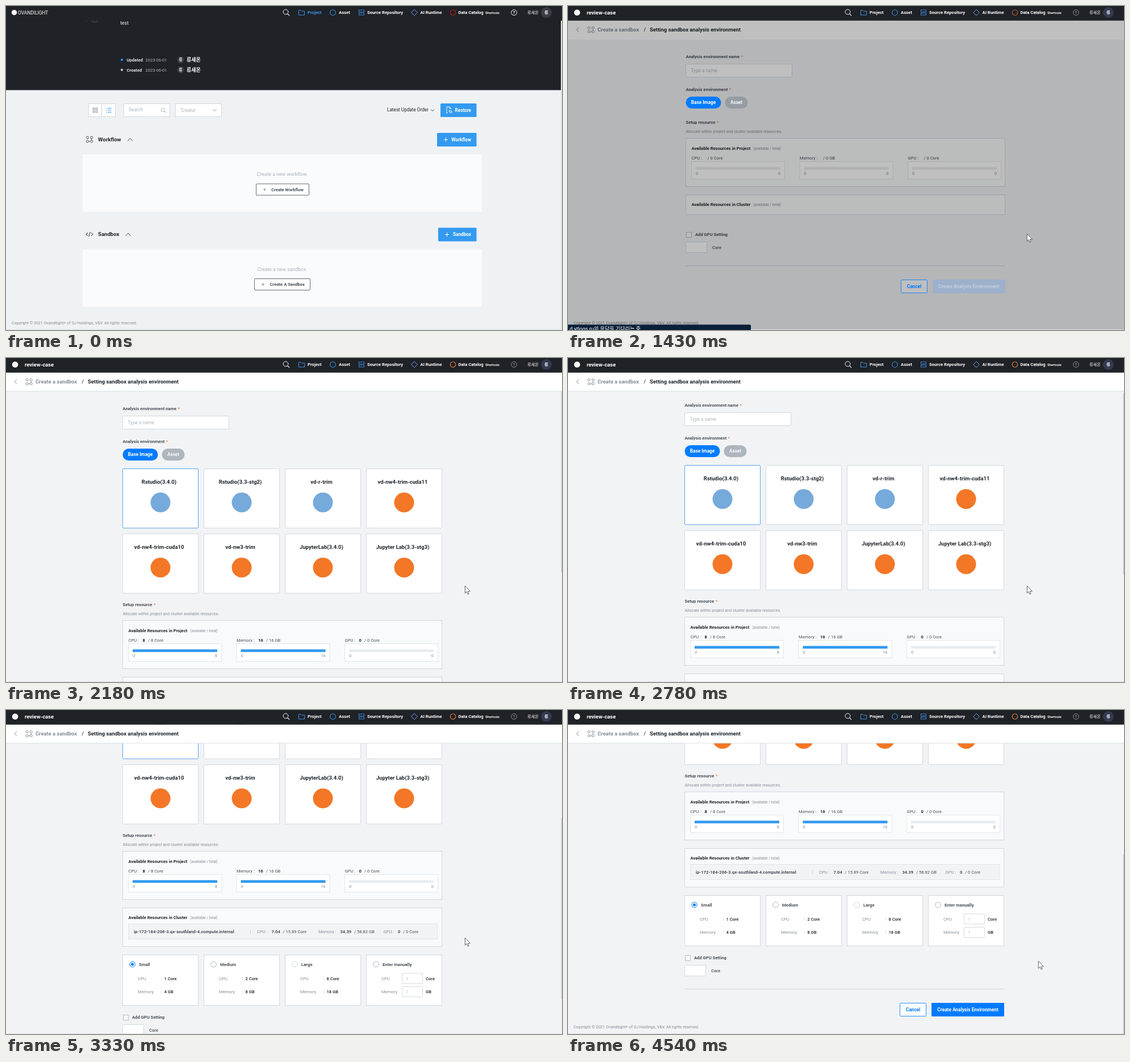
An HTML page that plays this animation: 979 by 572 pixels, repeating every 4.61 s.

```html
<!DOCTYPE html>
<html lang="en">
<head>
<meta charset="utf-8">
<title>Sandbox setup</title>
<style>
html, body { margin: 0; width: 100%; height: 100%; overflow: hidden; background: #f1f3f5; }
svg { display: block; width: 100%; height: 100%; font-family: Roboto, "Noto Sans CJK KR", "Noto Sans CJK", sans-serif; }
text { white-space: pre; }
</style>
</head>
<body>
<svg id="stage" viewBox="0 0 979 572"></svg>
<script>
const LOOP = 4610;
const INK = '#212529', DARK = '#1f2226', BODY = '#495057', GREY = '#868e96', PALE = '#adb5bd';
const LINE = '#ced4da', SKY = '#339af0', BLUE = '#007bff', WHITE = '#fff';
const USER = '류새온', INITIAL = '류';

// y is the vertical middle of the capitals
const text = (x, y, s, size = 7.6, fill = BODY, weight = 400, anchor = 'start') =>
  `<text x="${x}" y="${(y + size * 0.36).toFixed(2)}" font-size="${size}" fill="${fill}" font-weight="${weight}" text-anchor="${anchor}">${s}</text>`;
const bold = (x, y, s, size = 7.6, fill = BODY, anchor) => text(x, y, s, size, fill, 700, anchor);
const box = (x, y, w, h, fill, stroke, r = 0) => stroke
  ? `<rect x="${x + 0.5}" y="${y + 0.5}" width="${w - 1}" height="${h - 1}" rx="${r}" fill="${fill}" stroke="${stroke}" stroke-width=".85"/>`
  : `<rect x="${x}" y="${y}" width="${w}" height="${h}" rx="${r}" fill="${fill}"/>`;
const line = (d, stroke, w = 1) => `<path d="${d}" fill="none" stroke="${stroke}" stroke-width="${w}"/>`;
const dot = (x, y, r, fill, stroke = 'none', w = 1) =>
  `<circle cx="${x}" cy="${y}" r="${r}" fill="${fill}" stroke="${stroke}" stroke-width="${w}"/>`;
const group = (id, body) => `<g id="${id}">${body}</g>`;
const plus = (x, y, c, r = 3.5) => line(`M${x - r} ${y}h${2 * r}M${x} ${y - r}v${2 * r}`, c);
const chevron = (x, y, c, w, h) => line(`M${x - w} ${y - h / 2}l${w} ${h}l${w} ${-h}`, c);
const lens = (x, y, r, c) => dot(x, y, r, 'none', c) + line(`M${x + r * 0.7} ${y + r * 0.7}l${r * 0.8} ${r * 0.8}`, c, 1.1);
const nodes = (x, y, c) => [[-3.6, -3.4], [3.6, -3.4], [-3.6, 3.4], [3.6, 3.4]]
  .map(([a, b]) => `<rect x="${x + a - 1.9}" y="${y + b - 1.9}" width="3.8" height="3.8" rx="1.3" fill="none" stroke="${c}"/>`).join('')
  + line(`M${x - 1.7} ${y + 3.4}h3.4M${x + 3.6} ${y - 1.5}v3`, c, 0.8);

function nav(active, ring, help, avatar) {
  const c = '#3d94ee';
  return lens(492.5, 10.5, 4.4, WHITE)
    + line('M515.5 7.5h3.5l1.5 1.6h5v6.9h-10z', c) + bold(531, 11.5, 'Project', 7.65, active)
    + line('M575.5 6.2l4.6 2.7v5.4l-4.6 2.7l-4.6-2.7v-5.4z', c) + bold(586, 11.5, 'Asset', 7.65, WHITE)
    + box(621, 6.5, 10, 4.5, 'none', c) + box(621, 12, 10, 4.5, 'none', c)
    + bold(636, 11.5, 'Source Repository', 7.65, WHITE)
    + line('M719 6.2l5.3 5.3l-5.3 5.3l-5.3-5.3z', '#6fa5f5') + bold(729.5, 11.5, 'AI Runtime', 7.65, WHITE)
    + `<circle id="${ring}" cx="787" cy="11.5" r="4.7" fill="none" stroke="${ring === 'ringA' ? '#cf201c' : '#f0813a'}" stroke-width="1.1"/>`
    + bold(796.5, 11.5, 'Data Catalog', 7.65, WHITE) + bold(844, 11.8, 'Shortcuts', 5.7, WHITE)
    + dot(894.5, 11.5, 4.9, 'none', help) + bold(894.5, 11.5, '?', 7, help, 'middle')
    + text(918, 11.5, USER, 7.2, WHITE) + dot(951.5, 11.5, 9.4, avatar)
    + bold(951.5, 11.5, INITIAL, 7.4, WHITE, 'middle');
}

const copyright = y => text(10, y, 'Copyright © 2021 Ovandilight+ of OJ Holdings, V&amp;V. All rights reserved.', 7.02, GREY);

function section(y, name, lower, label, bx, cx, cw) {
  return bold(162, y, name, 9.6, INK)
    + chevron(name === 'Workflow' ? 218.5 : 215, y + 0.5, BODY, 4.5, -5)
    + box(bx, y - 11.5, 828.5 - bx, 24, SKY, null, 1.5)
    + plus(bx + 15.5, y + 0.5, WHITE) + bold(819, y + 0.5, name, 8.2, WHITE, 'end')
    + box(135, y + 26.5, 703, 101.5, '#fafbfc')
    + text(486.5, y + 61.5, `Create a new ${lower}.`, 8.7, PALE, 400, 'middle')
    + box(cx, y + 78, cw, 21, WHITE, BODY, 1)
    + plus(cx + 15.5, y + 88.5, GREY, 2.5) + bold(cx + cw - 10, y + 88.5, label, 7.65, BODY, 'end');
}

function project() {
  const person = (y, label, c) => dot(204, y, 2, c) + bold(212.5, y, label, 7.6, '#dee2e6')
    + text(245.5, y, '2023-06-01', 7.55, PALE) + dot(307.5, y, 6, '#3a3e43')
    + bold(307.5, y, INITIAL, 6.4, WHITE, 'middle') + bold(318, y, USER, 9, WHITE);
  const grid = [[152.5, 179.5], [157.5, 179.5], [152.5, 184.5], [157.5, 184.5]]
    .map(([x, y]) => box(x, y, 4, 4, 'none', GREY)).join('');
  const list = [180.5, 184, 187.5].map(y => line(`M176 ${y}h1.5M179 ${y}h6.5`, SKY, 1.2)).join('');
  return box(0, 0, 979, 572, '#eff2f5') + box(0, 0, 979, 148.5, DARK)
    + line('M150 25.5Q156 31 162 25.5', '#3a3e43', 2) + line('M139.5 26.5h3', '#3a3e43')
    + box(0, 0, 979, 25.5, DARK)
    + dot(14.5, 11.5, 4.7, WHITE) + text(21, 12, 'OVANDILIGHT', 8.4, WHITE)
    + nav('#3d94ee', 'ringA', WHITE, '#3a3e44')
    + text(201, 30, 'test', 8.78, '#f1f3f5')
    + person(95, 'Updated', SKY) + person(112.8, 'Created', LINE)
    + box(145, 172, 48, 24, WHITE, LINE) + line('M168.5 172v24', LINE) + grid + list
    + box(207, 172, 82, 24, WHITE, LINE) + text(216, 183.5, 'Search', 8.2, PALE) + lens(276.5, 183.5, 3.2, PALE)
    + box(298, 172, 82, 24, WHITE, LINE) + text(307.5, 184, 'Creator', 8.2, PALE) + chevron(367.5, 184, GREY, 3, 3)
    + text(671, 183.5, 'Latest Update Order', 8.2, INK) + chevron(751, 184, BODY, 3, 3)
    + box(765, 172, 63.5, 24, SKY, null, 1.5)
    + line('M783.5 182v-1.5l-2.5-2.5h-5v11h2M781 178v3h2.5M785 185.5h-5M782 183.5l-2.3 2l2.3 2M785 185.5v3h-4', WHITE, 0.9)
    + bold(819, 183.8, 'Restore', 8.2, WHITE, 'end')
    + nodes(147, 235.5, BODY) + section(235.5, 'Workflow', 'workflow', 'Create Workflow', 759, 440, 94)
    + line('M144 400l-3.2 3l3.2 3M150 400l3.2 3l-3.2 3M148.2 399l-2.4 8', INK)
    + section(403, 'Sandbox', 'sandbox', 'Create A Sandbox', 761, 437, 99)
    + copyright(559.5) + box(977, 26, 2, 546, '#dfe2e5');
}

const COLS = [205, 348, 491, 634];
const IMAGES = ['Rstudio(3.4.0)', 'Rstudio(3.3-stg2)', 'vd-r-trim', 'vd-nw4-trim-cuda11',
  'vd-nw4-trim-cuda10', 'vd-nw3-trim', 'JupyterLab(3.4.0)', 'Jupyter Lab(3.3-stg3)'];

const images = () => IMAGES.map((name, i) => {
  const x = COLS[i % 4], y = i < 4 ? 195 : 310;
  return box(x, y, 134, 105.7, WHITE, i ? LINE : '#3f93e8', 1.5)
    + bold(x + 64.5, y + 23.5, name, 9.5, INK, 'middle')
    + dot(x + 67, y + 60, 17.5, i < 3 ? '#75aadb' : '#f37726');
}).join('');

const METERS = [['CPU :', 8, 'Core', 25.5, 28.5], ['Memory :', 16, 'GB', 38.5, 41.5], ['GPU :', 0, 'Core', 25.5, 28.5]];

function resources() {
  const meters = METERS.map(([label, n, unit, nx, wx], i) => {
    const x = 215 + 190.5 * i, vx = x + nx + (n > 9 ? 14 : 9.5);
    return text(x + 0.5, 498.2, label, 7.6, BODY)
      + `<g class="live">${bold(x + nx, 498.2, n, 7.6, INK)}${text(vx, 498.2, `/ ${n} ${unit}`, 7.6, BODY)}</g>`
      + `<g class="wait">${text(x + wx, 498.5, `/ 0 ${unit}`, 7.6, BODY)}</g>`
      + box(x, 504, 165, 32, WHITE, '#dee2e6') + box(x + 8, 514.4, 149, 4.7, '#e9ecef')
      + (n ? `<rect class="bar" x="${x + 8}" y="514.4" width="0" height="4.7" fill="${SKY}"/>` : '')
      + text(x + 8, 524.8, 0, 7.6, GREY)
      + `<g class="live">${text(x + 157, 524.8, n, 7.6, GREY, 400, 'end')}</g>`
      + `<g class="wait">${text(x + 157, 524.8, 0, 7.6, GREY, 400, 'end')}</g>`;
  }).join('');
  const stat = (x, label, nx, n, vx, v) => text(x, 605.5, label, 7.6, GREY)
    + bold(nx, 605.5, n, 7.6, BODY) + text(vx, 605.5, v, 7.6, BODY);
  const row = box(215, 591, 545, 28, '#f1f3f5', '#dee2e6')
    + bold(225, 605.5, 'ip-172-184-206-3.qx-southland-4.compute.internal', 7.6, BODY)
    + line('M430.5 602v7', LINE)
    + stat(442, 'CPU :', 467.5, '7.04', 487.5, '/ 15.89 Core')
    + stat(550, 'Memory :', 588.5, '34.39', 613, '/ 58.82 GB')
    + stat(664.5, 'GPU :', 690, '0', 699, '/ 0 Core');
  return bold(205.5, 435.3, 'Setup resource', 7.6, BODY) + bold(260, 435.3, '*', 7.6, '#f0813a')
    + text(205.5, 451.1, 'Allocate within project and cluster available resources.', 7.02, GREY)
    + box(205, 463, 563, 86, '#f9fafb', LINE)
    + bold(215.5, 481.5, 'Available Resources in Project', 7.6, INK) + text(324.3, 481.8, '(available / total)', 6.44, GREY)
    + meters
    + `<rect id="cluster" x="205.5" y="563.5" width="562" height="35" fill="#f9fafb" stroke="${LINE}" stroke-width=".85"/>`
    + bold(215.5, 580.5, 'Available Resources in Cluster', 7.6, INK) + text(324.3, 580.8, '(available / total)', 6.44, GREY)
    + `<g class="live">${row}</g>`;
}

function plans() {
  const rows = [688, 711.5];
  return [['Small', 1, 4], ['Medium', 2, 8], ['Large', 8, 18], ['Enter manually']].map(([name, cpu, mem], i) => {
    const x = COLS[i], on = i === 0;
    const cells = rows.map((y, k) => {
      const unit = k ? 'GB' : 'Core';
      return text(x + 27, y, k ? 'Memory' : 'CPU', 7.7, GREY) + (cpu
        ? line(`M${x + 68.5} ${y - 3}v6`, '#dee2e6') + text(x + 73.5, y, `${k ? mem : cpu} ${unit}`, 7.6, INK, 500)
        : box(x + 63, y - 9.5, 37, 19, WHITE, LINE, 1) + text(x + 70, y, 1, 7.6, PALE) + text(x + 105, y, unit, 7.6, INK, 500));
    }).join('');
    return box(x, 646, 134, 90, WHITE, LINE)
      + dot(x + 17.5, 663, 4.8, WHITE, on ? BLUE : i === 2 ? LINE : PALE) + (on ? dot(x + 17.5, 663, 2.5, BLUE) : '')
      + bold(x + 29, 663, name, 7.7, BODY) + cells;
  }).join('');
}

const footer = () => box(206, 752, 10, 10, '#f8f9fa', PALE) + bold(222, 756.7, 'Add GPU Setting', 7.6, BODY)
  + box(205, 769, 38, 20, WHITE, LINE, 1) + text(252, 779, 'Core', 7.6, BODY, 500)
  + line('M205.5 811.5H768', LINE) + box(584, 836, 47, 24, WHITE);

const form = () => bold(205.5, 89.5, 'Analysis environment name', 7.6, BODY) + bold(302.5, 89.5, '*', 7.6, '#f0813a')
  + box(205, 102, 188, 24, WHITE, LINE, 1) + text(214.5, 114, 'Type a name', 8.2, PALE)
  + bold(205.5, 147.5, 'Analysis environment', 7.6, BODY) + bold(281.5, 147.5, '*', 7.6, '#f0813a')
  + `<g class="live">${images()}${plans()}</g>` + group('res', resources()) + group('foot', footer())
  + `<g class="live">${copyright(878.5)}</g>`;

const buttons = () => box(205.5, 160, 62, 21, BLUE, null, 10.5) + bold(236.5, 170.4, 'Base Image', 8.2, WHITE, 'middle')
  + '<rect id="asset" x="274.5" y="160" width="40" height="21" rx="10.5"/>'
  + bold(294.5, 170.4, 'Asset', 8.2, '#f8f9fa', 'middle')
  + group('actions', box(584, 836, 47, 24, 'none', BLUE, 1) + bold(607.5, 848, 'Cancel', 8.3, BLUE, 'middle')
    + '<rect id="create" x="640" y="836" width="128" height="24" rx="1"/>'
    + `<g id="createText">${bold(704, 848, 'Create Analysis Environment', 8.3, 'inherit', 'middle')}</g>`);

const topBar = () => box(0, 0, 979, 25.8, DARK) + dot(16, 11.5, 5.3, WHITE) + bold(33, 11.5, 'review-case', 9.4, WHITE)
  + nav(WHITE, 'ringB', '#8d9094', '#343a50');

const crumbs = () => box(0, 25.5, 979, 33, WHITE) + line('M0 58.5H979', '#dee2e6')
  + line('M19 38l-4 4l4 4', GREY) + nodes(40.5, 42, GREY)
  + bold(52, 42, 'Create a sandbox', 9.36, GREY) + bold(133.5, 42, '/', 9.36, BODY)
  + bold(144, 42, 'Setting sandbox analysis environment', 9.36, INK);

const stage = document.getElementById('stage');
stage.innerHTML = group('project', project())
  + group('setup', box(0, 0, 979, 572, '#f1f3f5')
    + group('form', form()) + `<g class="wait">${copyright(559.5)}</g>`
    + '<rect class="dim" width="979" height="572"/>'
    + group('buttons', buttons()) + crumbs() + '<rect class="dim" y="25.5" width="979" height="33"/>' + topBar()
    + '<rect id="thumb" x="977.7" width="1.3" fill="#c1c5c9"/>')
  + box(0, 571, 979, 1, '#dcdfe3')
  + group('status', '<path d="M0 562.5H320q2 0 2 2V572H0z" fill="#0a1f38"/>'
    + text(128, 570, 'd.ytlogs.ru의 응답을 기다리는 중', 9.15, WHITE, 400, 'end'))
  + group('cursor', '<path d="M.3 .3V13.2L3.2 10.5L5.1 15L7.1 14.1L5.2 9.8H9.3Z" fill="#fff" stroke="#222" stroke-width=".7"/>');

const $ = id => document.getElementById(id);
const all = c => [...stage.querySelectorAll(c)];
const live = all('.live'), wait = all('.wait'), dims = all('.dim'), bars = all('.bar');
const show = (el, on) => el.setAttribute('visibility', on ? 'inherit' : 'hidden');
const move = (id, x, y) => $(id).setAttribute('transform', `translate(${x} ${y})`);
const paint = (id, fill) => $(id).setAttribute('fill', fill);

// number of steps taken, the first at a and the n-th at b
const steps = (t, a, b, n) => t < a ? 0 : Math.min(n, 1 + Math.floor((t - a) * (n - 1) / (b - a) + 1e-6));
const mix = (a, b, p) => a + (b - a) * p;

const SCROLL = [0, 6, 22, 43, 64, 84.2, 111, 143, 178, 214, 250, 284, 308, 319];
const REACH_X = [838, 829, 818, 809, 803, 801, 804, 808];
const REACH_Y = [426, 419, 413, 408, 405, 403, 402, 402];

function cursorAt(t) {
  const enter = steps(t, 70, 280, 5), reach = steps(t, 420, 880, 7), leave = steps(t, 4340, 4540, 4) / 4;
  if (!enter) return [934, 600];
  if (!reach) {
    const p = 1 - (1 - (enter - 1) / 4) ** 1.5;
    return [mix(934, 838, p), mix(562, 426, p)];
  }
  return [mix(REACH_X[reach], 828, leave), mix(REACH_Y[reach], 443, leave)];
}

function draw(t) {
  const loaded = t >= 1640, shown = t >= 1360;
  const dim = t < 1430 ? 0.12 : 0.25 * (1 - steps(t, 1500, 1780, 5) / 5);
  const fill = steps(t, 1980, 2180, 4) / 4;
  const y = SCROLL[steps(t, 2780, 3260, 8) + steps(t, 3330, 3610, 5)];
  const x = loaded ? 0 : 2;

  show($('project'), !shown);
  show($('setup'), shown);
  show($('status'), t >= 1290 && t < 1500);
  live.forEach(el => show(el, loaded));
  wait.forEach(el => show(el, !loaded));
  dims.forEach(el => el.setAttribute('opacity', dim));
  bars.forEach(el => el.setAttribute('width', 149 * fill));

  move('form', x, -y);
  move('buttons', x, -y);
  move('res', 0, loaded ? 0 : -230);
  move('foot', 0, loaded ? 0 : -353);
  move('actions', 0, loaded ? 0 : -353);
  $('cluster').setAttribute('height', loaded ? 68 : 35);
  paint('asset', loaded ? PALE : '#969ca3');
  paint('create', loaded ? BLUE : '#9db0cc');
  paint('createText', loaded ? WHITE : '#c3cedd');
  $('ringB').setAttribute('stroke', loaded ? '#f0813a' : '#b9603c');

  show($('thumb'), loaded);
  $('thumb').setAttribute('y', 58.5 + y * 0.617);
  $('thumb').setAttribute('height', fill ? 320 : 387);
  move('cursor', ...cursorAt(t));
}

function tick() {
  draw(performance.now() % LOOP);
  requestAnimationFrame(tick);
}
tick();
</script>
</body>
</html>
```
